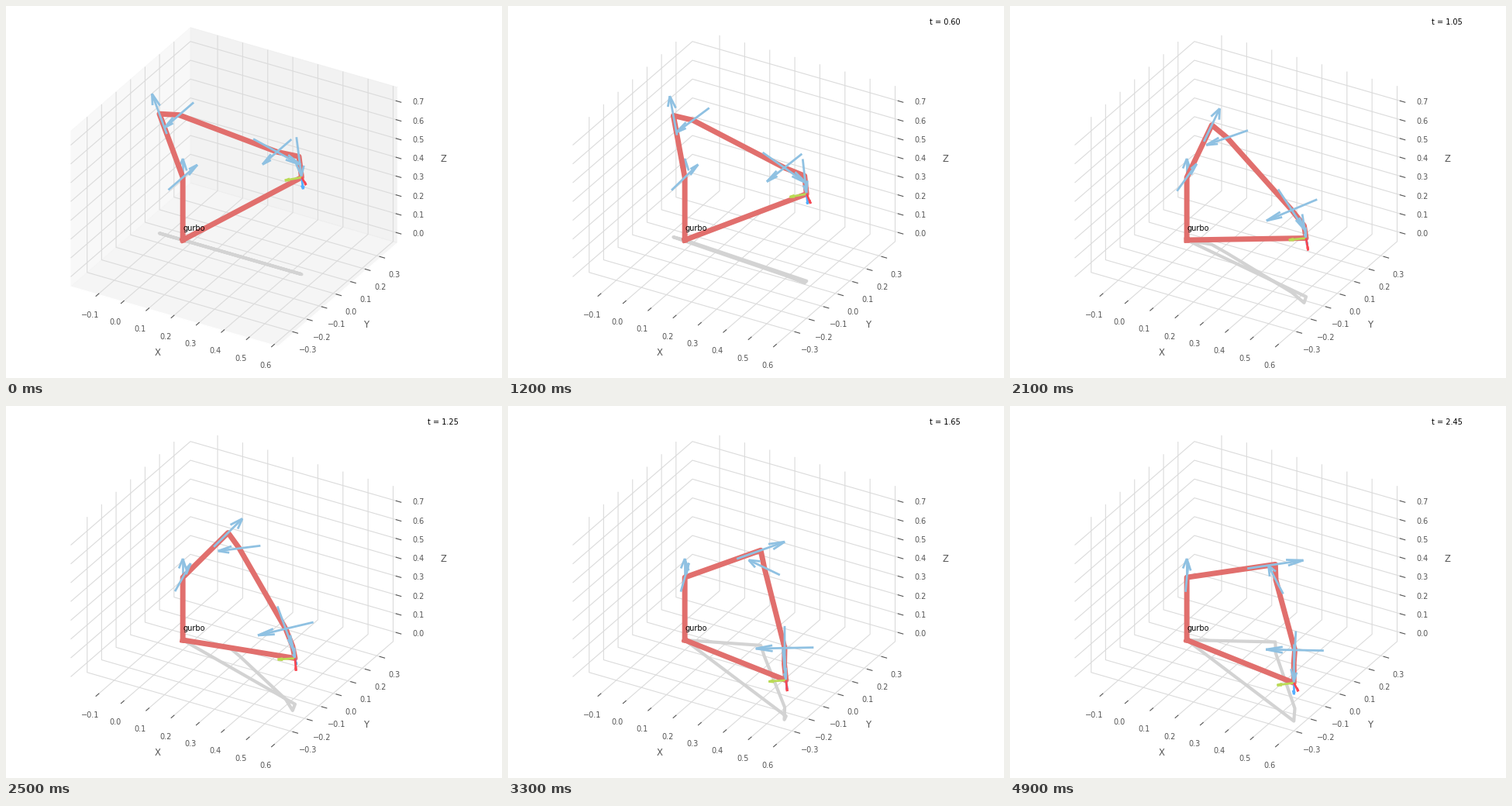
Write a matplotlib script that moves like this. It is 640 px wide and 480 px high and loops after 5 s.

```python
import numpy as np
import matplotlib.pyplot as plt
from matplotlib.animation import FuncAnimation

STEPS, INTERVAL, DT = 50, 100, 0.05
HALF_PI = np.pi / 2

plt.rcParams.update({
    "font.family": "DejaVu Sans",
    "font.size": 7,
    "axes.labelsize": "large",
    "axes.labelcolor": "#555555",
    "axes.edgecolor": "white",
    "axes.linewidth": 1,
    "axes.axisbelow": True,
    "xtick.color": "#555555",
    "ytick.color": "#555555",
    "grid.color": "#dbdbdb",
    "grid.linestyle": "-",
    "patch.linewidth": 0.5,
})

# Modified DH rows: alpha, a, d
LINKS = [
    (0, 0, 0.333),
    (-HALF_PI, 0, 0),
    (HALF_PI, 0, 0.316),
    (HALF_PI, 0.0825, 0),
    (-HALF_PI, -0.0825, 0.384),
    (HALF_PI, 0, 0),
    (HALF_PI, 0.088, 0),
]
FLANGE = 0.107
AXIS_LENGTH, TOOL_LENGTH = 0.2, 0.06
TOOL_COLORS = ["#F84752", "#BADA55", "#54AEFF"]


def link_transform(alpha, a, d, theta):
    ca, sa, ct, st = np.cos(alpha), np.sin(alpha), np.cos(theta), np.sin(theta)
    return np.array([
        [ct, -st, 0, a],
        [st * ca, ct * ca, -sa, -sa * d],
        [st * sa, ct * sa, ca, ca * d],
        [0, 0, 0, 1],
    ])


def forward(q):
    """Joint frames followed by the flange frame."""
    frames, pose = [], np.eye(4)
    for row, theta in zip(LINKS, q):
        pose = pose @ link_transform(*row, theta)
        frames.append(pose)
    frames.append(pose @ link_transform(0, 0, FLANGE, 0))
    return frames


def solve_pose(q, position, rotation):
    """Newton steps from a nearby guess to the wanted flange pose."""
    q = np.array(q, dtype=float)
    for _ in range(20):
        *joints, tip = forward(q)
        turn = np.cross(tip[:3, :3].T, rotation.T).sum(axis=0) / 2
        error = np.concatenate([position - tip[:3, 3], turn])
        jacobian = np.array([
            np.concatenate([np.cross(j[:3, 2], tip[:3, 3] - j[:3, 3]), j[:3, 2]])
            for j in joints
        ]).T
        q += np.linalg.pinv(jacobian) @ error
    return q


C = np.sqrt(0.5)
GOAL_ROTATION = np.array([[C, -C, 0], [-C, -C, 0], [0, 0, -1]])
Q_START = np.array([0, -0.3, 0, -2.2, 0, 2.0, np.pi / 4])
Q_END = solve_pose([0.493, 1.31, -1.311, -1.628, 1.323, 1.836, -0.311],
                   np.array([0.6, -0.3, 0.203]), GOAL_ROTATION)

fig = plt.figure(figsize=(6.4, 4.8), dpi=100, facecolor="white")
ax = fig.add_subplot(111, projection="3d", proj_type="ortho")
fig.subplots_adjust(left=-0.09, bottom=0, top=1, right=0.99)

RADIUS = 0.41335
for name, middle, first, last in [("x", 0.205, -1, 6), ("y", 0, -3, 3), ("z", 0.361, 0, 7)]:
    ax.set(**{
        f"{name}ticks": np.arange(first, last + 1) / 10,
        f"{name}lim": (middle - RADIUS, middle + RADIUS),
        f"{name}label": name.upper(),
    })

shadow, = ax.plot([], [], [], color="lightgrey", linewidth=3)
arm, = ax.plot([], [], [], color="#E16F6D", linewidth=5)
ax.text(0, 0, 0.05, "gurbo", color="black")
clock = fig.text(0.85, 0.95, "", color="black")
arrows = []


def add_arrow(start, vector, color):
    arrows.append(ax.quiver(*start, *vector, color=color, linewidth=2))


def update(i):
    u = i / (STEPS - 1)
    blend = u**3 * (10 - 15 * u + 6 * u**2)
    frames = forward(Q_START + (Q_END - Q_START) * blend)

    base = np.zeros(3)
    points = np.array([base, *(f[:3, 3] for f in frames), base])
    arm.set_data_3d(*points.T)
    shadow.set_data_3d(points[:, 0], points[:, 1], np.zeros(len(points)))

    while arrows:
        arrows.pop().remove()
    *joints, tip = frames
    for k, color in enumerate(TOOL_COLORS):
        add_arrow(tip[:3, 3], tip[:3, k] * TOOL_LENGTH, color)
    for joint in joints:
        vector = joint[:3, 2] * AXIS_LENGTH
        add_arrow(joint[:3, 3] - vector / 2, vector, "#8FC1E2")

    # The panes and the clock swap after the opening pose
    for axis in (ax.xaxis, ax.yaxis, ax.zaxis):
        axis.pane.set_visible(i == 0)
    clock.set_text(f"t = {i * DT:.2f}" if i else "")
    return [arm, shadow, clock, *arrows]


anim = FuncAnimation(fig, update, frames=STEPS, interval=INTERVAL,
                     init_func=lambda: update(0), repeat=True, repeat_delay=0)
plt.show()
```
